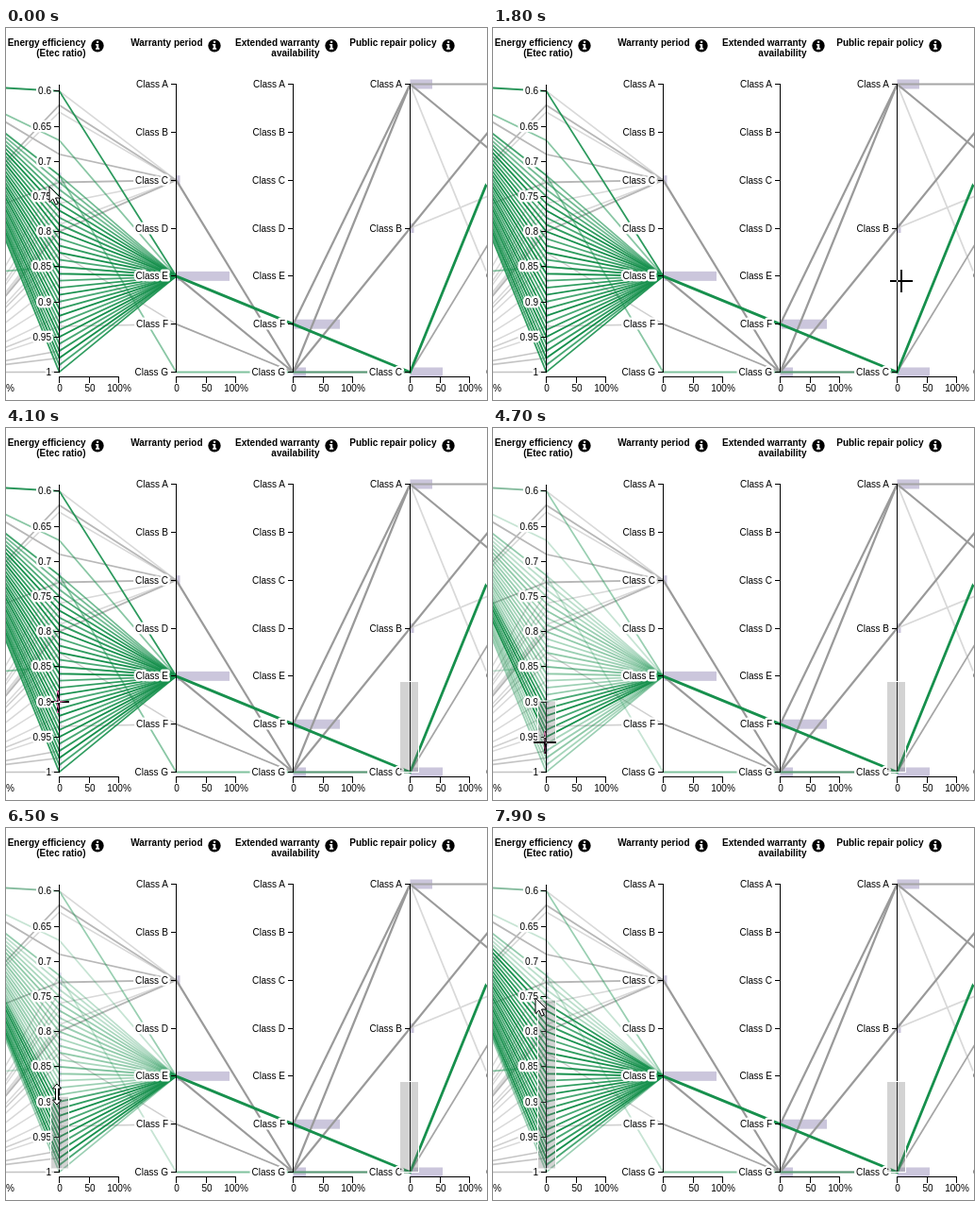
Animation, 510 px wide and 394 px high, one loop 8 s. Source, as an HTML page:

```html
<!DOCTYPE html>
<html lang="en">
<head>
<meta charset="utf-8">
<title>Parallel coordinates brushing</title>
<style>
  html, body { margin: 0; width: 100%; height: 100%; overflow: hidden; background: #fff; }
  svg { display: block; width: 510px; height: 394px; background: #fff; isolation: isolate; }
  text { font: 10px Arial, "Liberation Sans", sans-serif; }
  .title { font-weight: bold; text-anchor: end; }
  .label { text-anchor: end; stroke: #fff; stroke-width: 5px; stroke-linejoin: round; paint-order: stroke; }
  .scale { text-anchor: middle; }
  .line { fill: none; }
  .axis { fill: none; stroke: #000; shape-rendering: crispEdges; }
  .brush { fill: #777; fill-opacity: .32; stroke: #fff; }
  .cross { stroke: #fff; stroke-width: 2; mix-blend-mode: difference; }
  .pointer { fill: #fff; stroke: #000; }
</style>
</head>
<body>
<svg id="stage" viewBox="0 0 510 394"></svg>
<script>
const LOOP = 8000;
const GREEN = '#17904d', GRAY = '#9a9a9a', PALE = '#d9d9d9', BAR = '#cbc6dc';
const BEFORE = -67.5, RATIO = 56.5, WARRANTY = 180.5, EXTENDED = 304.5, POLICY = 428.5, AFTER = 552.5;
const AXES = [RATIO, WARRANTY, EXTENDED, POLICY];
const TOP = 59.5, BOTTOM = 364.5;
const stage = document.getElementById('stage');

function add(tag, attrs, content) {
  const node = document.createElementNS('http://www.w3.org/2000/svg', tag);
  for (const key in attrs) node.setAttribute(key, attrs[key]);
  if (content !== undefined) node.textContent = content;
  stage.appendChild(node);
  return node;
}
const line = (points, stroke, opacity = 1, width = 1.8) =>
  add('polyline', { class: 'line', points: points.join(' '), stroke, opacity, 'stroke-width': width });
const bar = (x, y, width, height = 10) => add('rect', { x, y: y - height / 2, width, height, fill: BAR });
const ratioY = v => 66.8 + (v - 0.6) * 744;
const classY = i => TOP + i * (BOTTOM - TOP) / 6;
const C = classY(2), D = classY(3), E = classY(4), F = classY(5);

// Distribution bars
[[WARRANTY, C, 4], [WARRANTY, E, 56.5], [EXTENDED, F, 49.5], [EXTENDED, BOTTOM, 13.5],
 [POLICY, TOP, 23.5], [POLICY, D, 4], [POLICY, BOTTOM, 34.5]].forEach(b => bar(...b));
for (let i = 12; i < 40; i++) bar(RATIO, ratioY(0.6 + i / 100), i === 13 ? 3 : 2, 6);

// Unselected products
for (let i = 0; i < 10; i++) {
  line([[BEFORE, BOTTOM], [RATIO, ratioY(0.72 + i * 0.025)]], PALE, 1, 1.5);
}
[[TOP, 0.6], [D, 0.63], [BOTTOM, 0.76], [BOTTOM, 0.79]].forEach(([from, v]) =>
  line([[BEFORE, from], [RATIO, ratioY(v)], [WARRANTY, C]], PALE, 1, 1.6));
[[D, 0.62], [TOP, 0.69], [D, 0.73], [BOTTOM, 0.8]].forEach(([from, v]) =>
  line([[BEFORE, from], [RATIO, ratioY(v)], [WARRANTY, C]], '#b8b8b8'));
[0.83, 0.935].forEach(v => line([[BEFORE, BOTTOM], [RATIO, ratioY(v)], [WARRANTY, F]], '#d0d0d0', 1, 1.6));
[0.97, 0.98, 1].forEach(v => line([[BEFORE, BOTTOM], [RATIO, ratioY(v)]], '#c4c4c4', 1, 1.6));
line([[POLICY, TOP], [AFTER, BOTTOM]], PALE);
line([[POLICY, D], [AFTER, C]], PALE);
[[WARRANTY, C, EXTENDED, BOTTOM], [WARRANTY, E, EXTENDED, BOTTOM],
 [EXTENDED, F, POLICY, TOP], [EXTENDED, BOTTOM, POLICY, TOP], [EXTENDED, BOTTOM, POLICY, D],
 [POLICY, TOP, AFTER, C], [POLICY, D, AFTER, TOP]]
  .forEach(([a, b, c, d]) => line([[a, b], [c, d]], GRAY, 1, 2.2));
[[WARRANTY, F, EXTENDED, BOTTOM], [EXTENDED, BOTTOM, POLICY, BOTTOM],
 [POLICY, TOP, AFTER, TOP], [POLICY, BOTTOM, AFTER, C]]
  .forEach(([a, b, c, d]) => line([[a, b], [c, d]], '#a6a6a6'));

// Selectable products: the fan around the ratio axis
const products = [];
function product(v, from, to, strength) {
  const y = ratioY(v);
  const node = line([[BEFORE, from], [RATIO, y], [WARRANTY, to]], GREEN, strength);
  products.push({ node, y, strength });
}
product(0.6, TOP, E, .9);
product(0.67, TOP, E, .5);
product(0.72, TOP, BOTTOM, .5);
product(0.85, E, E, .5);
for (let i = 12; i <= 40; i++) {
  product(0.6 + i / 100, TOP, E, i < 15 ? .6 : .78 + (i * 7 % 3) * .11);
}
line([[WARRANTY, BOTTOM], [POLICY, BOTTOM]], GREEN, .55);
line([[WARRANTY, E], [EXTENDED, F], [POLICY, BOTTOM], [AFTER, TOP]], GREEN, 1, 2.8);

// Axes
function axis(x, ticks) {
  const marks = ticks.map(([, y]) => `M${x - 6} ${Math.floor(y) + .5}H${x}`).join('');
  add('path', { class: 'axis', d: `M${x} ${TOP}V${BOTTOM}${marks}` });
  ticks.forEach(([name, y]) => add('text', { class: 'label', x: x - 8.5, y: y + 3.5 }, name));
  add('path', { class: 'axis', d: `M${x} 375.5V369.5H${x + 63}V375.5M${x + 32} 369.5V375.5` });
}
const classes = (letters, step) => [...letters].map((c, i) => ['Class ' + c, TOP + i * step]);
const seven = classes('ABCDEFG', 305 / 6);
axis(RATIO, [0.6, 0.65, 0.7, 0.75, 0.8, 0.85, 0.9, 0.95, 1].map(v => [String(v), ratioY(v)]));
axis(WARRANTY, seven);
axis(EXTENDED, seven);
axis(POLICY, classes('ABC', 305 / 2));
classes('ABCD', 305 / 3).slice(1).forEach(([name, y]) =>
  add('text', { class: 'label', x: AFTER - 8.5, y: y + 3.5 }, name));
[BEFORE, ...AXES].forEach(x => [['0', 0], ['50', 32], ['100%', 63]].forEach(([s, dx]) =>
  add('text', { class: 'scale', x: x + dx + .5, y: 385 }, s)));

// Titles and info badges
[['Energy efficiency', '(Etec ratio)'], ['Warranty period'],
 ['Extended warranty', 'availability'], ['Public repair policy']].forEach((rows, i) => {
  const x = AXES[i];
  rows.forEach((s, row) => add('text', { class: 'title', x: x + 28, y: 19 + row * 11 }, s));
  add('circle', { cx: x + 40.5, cy: 18.7, r: 6.7 });
  add('path', { d: `M${x + 39.5} 13.7h2.2v2.1h-2.2zM${x + 38.5} 17h3.2v4.2h1v1.5h-4.2v-1.5h1v-2.7h-1z`, fill: '#fff' });
});

// Brushes and pointers
const ratioBrush = add('rect', { class: 'brush', x: 47.5, width: 19 });
const policyBrush = add('rect', { class: 'brush', x: 417.5, width: 20 });
const pointers = {
  arrow: add('path', { class: 'pointer', d: 'M0 0V16.5L3.8 13L6.6 19.2L9.2 18L6.5 12H11.8Z' }),
  cross: add('path', { class: 'cross', d: 'M-12 0H12M0 -12V12' }),
  resize: add('path', { class: 'pointer', d: 'M0 -11L4.5 -6H1.5V6H4.5L0 11L-4.5 6H-1.5V-6H-4.5Z' })
};

// Keys: time, then values
const pointerPath = [
  [0, 46, 168], [300, 46, 168], [1500, 433, 268], [1850, 433, 268], [2550, 430, 398], [2800, 430, 398],
  [3100, 390, 350], [3900, 55, 290], [4300, 55, 290], [5000, 55, 361], [5150, 55, 361],
  [5600, 55, 290], [6400, 55, 290], [7200, 45, 228], [7900, 45, 180], [8000, 45, 175]
];
const brushTop = [[0, 289], [6400, 289], [7200, 251], [7900, 182], [8000, 177]];
const brushEnd = [[0, 289], [4300, 289], [5000, 361], [8000, 361]];

function sample(keys, t, eased) {
  const i = Math.max(1, keys.findIndex(k => k[0] >= t));
  const a = keys[i - 1], b = keys[i];
  let u = (t - a[0]) / (b[0] - a[0]);
  if (eased) u = u * u * (3 - 2 * u);
  return a.slice(1).map((v, n) => v + (b[n + 1] - v) * u);
}
function setBrush(rect, top, bottom, shown) {
  rect.setAttribute('visibility', shown ? 'visible' : 'hidden');
  rect.setAttribute('y', top);
  rect.setAttribute('height', Math.max(0, bottom - top));
}

function draw(t) {
  const [x, y] = sample(pointerPath, t, t < 6400);
  const [top] = sample(brushTop, t);
  const [bottom] = sample(brushEnd, t, true);
  const filtering = t > 4300;
  const policyEnd = t < 2550 ? Math.min(BOTTOM, Math.max(268.5, y)) : BOTTOM;

  setBrush(policyBrush, 268.5, policyEnd, t > 1850);
  setBrush(ratioBrush, top, bottom, filtering);
  for (const p of products) {
    const kept = !filtering || (p.y >= top && p.y <= bottom);
    p.node.setAttribute('opacity', kept ? p.strength : p.strength * .48);
  }

  const overAxis = y > TOP && y < BOTTOM && AXES.some(a => Math.abs(x - a) < 10);
  const kind = !overAxis ? 'arrow' : t > 5400 ? 'resize' : 'cross';
  for (const name in pointers) {
    pointers[name].setAttribute('visibility', name === kind ? 'visible' : 'hidden');
    pointers[name].setAttribute('transform', `translate(${Math.round(x)} ${Math.round(y)})`);
  }
}

const start = performance.now();
function tick() {
  draw((performance.now() - start) % LOOP);
  requestAnimationFrame(tick);
}
tick();
</script>
</body>
</html>
```
